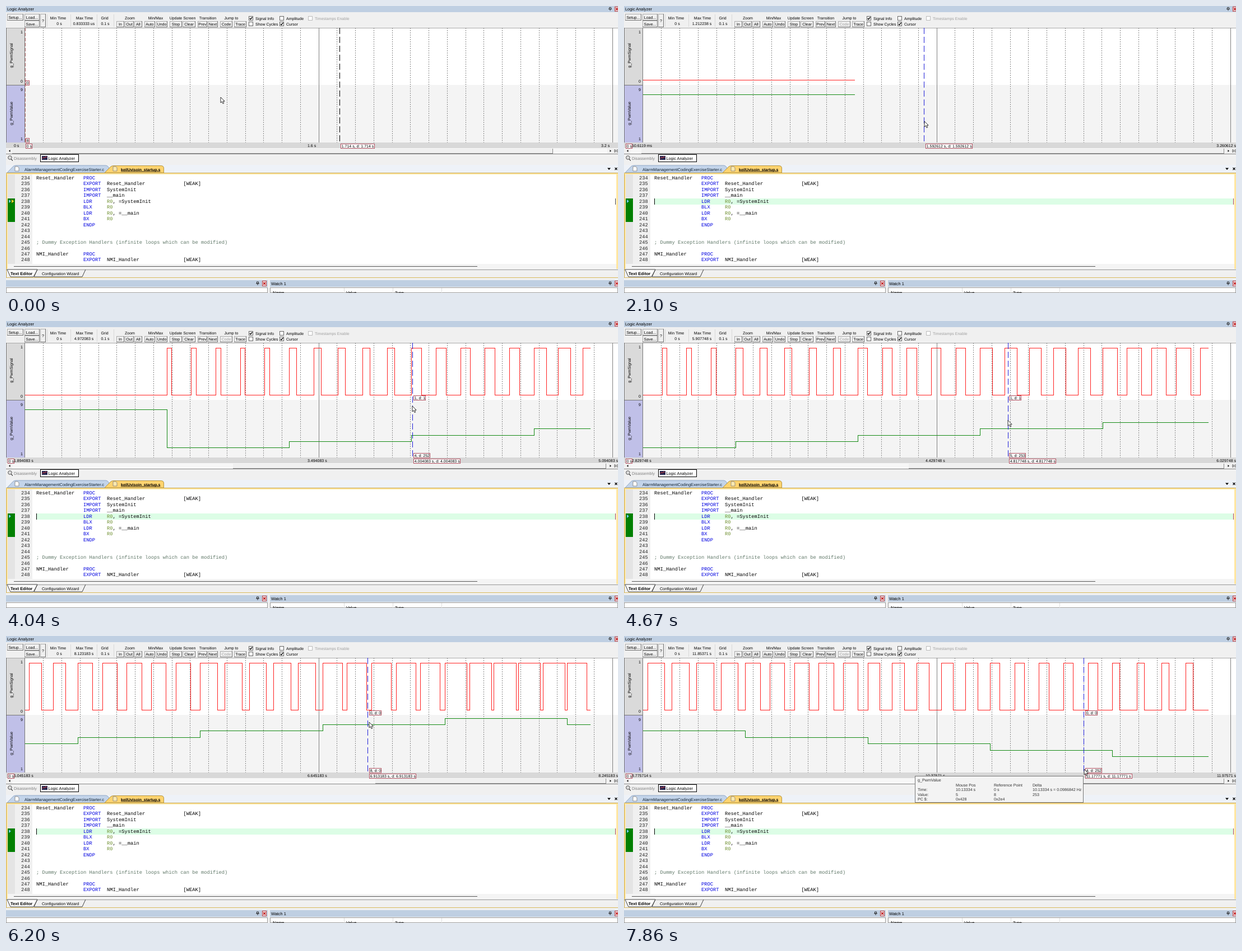
An HTML page that plays this animation: 1092 by 513 pixels, repeating every 7.99 s.

```html
<!DOCTYPE html>
<html lang="en">
<head>
<meta charset="utf-8">
<title>Logic Analyzer</title>
<style>
html, body { margin: 0; width: 1092px; height: 513px; overflow: hidden; background: #f0f0f0; }
svg { display: block; }
text { font-family: "Liberation Sans", Arial, sans-serif; white-space: pre; text-rendering: geometricPrecision; }
.code text { font-family: "Liberation Mono", "Courier New", monospace; }
rect, .crisp { shape-rendering: crispEdges; }
</style>
</head>
<body>
<svg width="1092" height="513" viewBox="0 0 1092 513">
  <g id="base"></g><g id="plot"></g><g id="code" class="code"></g><g id="over"></g>
</svg>
<script>
const LOOP = 7990, LEFT = 34, SCALE = 327.5, SPAN = 3.2;
const START = 2.6673, STEP = 2 / 3, PULSE = STEP / 5;

const $ = id => document.getElementById(id);
const rect = (x, y, w, h, fill, stroke) => stroke
  ? `<rect x="${x + .5}" y="${y + .5}" width="${w - 1}" height="${h - 1}" fill="${fill}" stroke="${stroke}"/>`
  : `<rect x="${x}" y="${y}" width="${w}" height="${h}" fill="${fill}"/>`;
const path = (d, stroke, fill = 'none', more = '') =>
  `<path d="${d}" stroke="${stroke}" fill="${fill}" ${more}/>`;
const line = (d, stroke, dash = '') =>
  path(d, stroke, 'none', `class="crisp" stroke-dasharray="${dash}"`);
const text = (x, y, s, size = 7, fill = '#000', more = '') =>
  `<text x="${x}" y="${y}" font-size="${size}" fill="${fill}" ${more}>${s}</text>`;
const mid = (x, y, s, fill) => text(x, y, s, 7, fill, 'text-anchor="middle"');

function button(x, y, w, h, label, fill) {
  return rect(x, y, w, h, '#f0f0f0', '#aaa') +
    line(`M${x} ${y + h - .5}H${x + w - .5}V${y}`, '#707070') +
    mid(x + w / 2, y + h / 2 + 2.5, label, fill);
}

function check(x, y, label, on, fill = '#000') {
  return rect(x, y, 8, 8, '#fff', fill === '#000' ? '#666' : '#bbb') +
    (on ? path(`M${x + 1.8} ${y + 3.8}l1.6 1.9l3-3.7`, '#000', 'none', 'stroke-width="1.3"') : '') +
    text(x + 12, y + 6.7, label, 7, fill);
}

const close = (x, y, c) => path(`M${x - 2} ${y - 2}l4 4m0-4l-4 4`, c, 'none', 'stroke-width="1.2"');
const pin = (x, y) => path(`M${x - 1.5} ${y - 3}h3v3h-3zm-1.5 3h6m-3 0v3`, '#222', 'none', 'stroke-width=".9"');

function titleBar(x, y, w, h, label) {
  const end = x + w;
  return rect(x, y, w, h, '#bfcfe2') + text(x + 2, y + h - 3.4, label, 7.4) +
    pin(end - (end > 1000 ? 14 : 18), y + h / 2) +
    rect(end - (end > 1000 ? 6 : 10), y + 1, 8, h - 2, '#eadfe4', '#c04848') +
    close(end - (end > 1000 ? 2 : 6), y + h / 2, '#c00000');
}

function base() {
  let s = titleBar(0, 0, 1092, 11, 'Logic Analyzer') + rect(0, 11, 1092, 28, '#f0f0f0');
  s += button(2, 14, 29, 12, 'Setup...') + button(33, 14, 27, 12, 'Load...') +
    button(33, 26, 27, 12, 'Save...') + button(61, 14, 10, 24, '?');
  [['Min Time', 93], ['Max Time', 140], ['Grid', 176], ['Zoom', 221], ['Min/Max', 267],
    ['Update Screen', 315], ['Transition', 360], ['Jump to', 402]].forEach(([n, x]) => s += mid(x, 24.3, n));
  s += line('M73.5 15V37M115.5 15V37M162.5 15V37M192.5 15V37', '#d8d8d8') + mid(95, 34.3, '0 s') + mid(177, 34.3, '0.1 s');
  [['In', 197, 14], ['Out', 212, 16], ['All', 229, 14], ['Auto', 247, 19], ['Undo', 268, 20], ['Stop', 292, 22],
    ['Clear', 315, 23], ['Prev', 342, 17], ['Next', 360, 18], ['Trace', 407, 22]]
    .forEach(([n, x, w]) => s += button(x, 27, w, 11, n));
  s += check(433, 18, 'Signal Info', 1) + check(433, 28, 'Show Cycles', 0) + check(488, 18, 'Amplitude', 0) +
    check(488, 28, 'Cursor', 1) + check(539, 18, 'Timestamps Enable', 0, '#a0a0a0');

  // Analyzer panes
  s += rect(0, 39, 34, 102, '#dadada') + rect(0, 141, 34, 103, '#c0c0e8') +
    rect(34, 39, 1058, 102, '#fff') + rect(34, 141, 1058, 103, '#f4f4f4') +
    line('M0 39.5H1092', '#aaa') + line('M.5 39V244M33.5 39V244M0 141.5H34M0 244.5H34', '#777');
  [['1', 48.5], ['0', 136.5], ['9', 151.5], ['1', 239.5]].forEach(([n, y]) => s += text(26, y, n));
  [['g_PwmSignal', 88.5], ['g_PwmValue', 192]].forEach(([n, y]) =>
    s += text(0, 0, n, 7.2, '#000', `text-anchor="middle" transform="translate(12 ${y}) rotate(-90)"`));
  let grid = '';
  for (let i = 1; i < 32; i++) if (i !== 16) grid += `M${Math.floor(LEFT + i * 32.75) + .5} 39V244`;
  s += line(grid, '#858585', '2 2') + line('M558.5 39V244M1082.5 39V244', '#808080') +
    rect(0, 244, 1092, 10, '#d8d8d8') + rect(0, 254, 1092, 10, '#f7f7f7');

  // Pane tabs
  s += rect(0, 264, 1092, 20, '#f0f0f0') + line('M0 264.5H1092', '#888') +
    '<circle cx="7" cy="271" r="3.3" fill="#ddd" stroke="#555"/>' + line('M9 273l3 4', '#555') +
    text(14, 275, 'Disassembly', 7.2, '#808080') + rect(61, 265, 69, 14, '#fff', '#000') +
    rect(64, 268, 10, 7, '#26264e') + path('M65 273l2-3 2 2 2-3 2 2', '#d04040') + text(75.5, 275, 'Logic Analyzer', 7.3);

  // Editor
  s += rect(0, 284, 1092, 15, '#eef2f8') +
    path('M2 298L13 286.5Q15 285 18 285H178Q184 285 186 298Z', '#91a7c4', '#c3d4ea') +
    path('M176 298L187 287Q189 285.5 192 285.5H277Q281 285.5 281.5 289V298Z', '#b59642', '#ffd470');
  [[16, '#fff'], [191, '#ffe9ae']].forEach(([x, c]) =>
    s += path(`M${x} 287h5l2 2v6h-7z`, '#7d7d7d', c, 'stroke-width=".8"'));
  s += text(33, 294.5, 'AlarmManagementCodingExerciseStarter.c', 7.42, '#123') +
    text(205, 294.5, 'keilUvisoin_startup.s', 7, '#000', 'font-weight="bold" text-decoration="underline"') +
    path('M1073 289.5h6l-3 3.5z', 'none', '#000') + close(1088.5, 291, '#000');
  s += rect(0, 298, 1092, 188, '#ffe6a0') + line('M0 298.5H1092', '#c9a850') +
    rect(3, 301, 1086, 160, '#fff') + rect(3, 301, 13, 160, '#e4e4e4') + rect(16, 301, 31, 160, '#f0f0f0') +
    rect(3, 344, 13, 42, '#008000') +
    rect(3, 461, 1086, 9, '#f4f4f4') + line('M14 465.5H841', '#555') +
    rect(0, 470, 1092, 15, '#f0f0f0') + line('M0 471.5H1092', '#999') + line('M.5 300V485', '#c9a850') +
    path('M2 471L8 484H49L56 471Z', '#444', '#fff') + path('M56 471L50 484H136L142 471', '#444') +
    text(8, 481, 'Text Editor', 7.65, '#000', 'font-weight="bold"') + text(64, 481, 'Configuration Wizard', 7.1) +
    rect(0, 485, 1092, 1, '#d9b95c') + rect(0, 486, 1092, 4, '#f0f0f0');

  // Lower panes
  s += titleBar(0, 490, 467, 12, '') + titleBar(471, 490, 621, 12, 'Watch 1') +
    rect(0, 503, 467, 10, '#fff', '#999') + rect(471, 503, 621, 10, '#fff', '#999') +
    line('M603.5 504V513M690.5 504V513M777.5 504V513', '#ddd') +
    text(476, 514.5, 'Name', 7.6) + text(607, 514.5, 'Value', 7.4) + text(694, 514.5, 'Type', 7.3);
  return s;
}

function code() {
  const op = (name, rest = '') => ' '.repeat(16) + name.padEnd(8) + rest;
  const weak = name => op('EXPORT', name.padEnd(26) + '[WEAK]');
  const lines = ['Reset_Handler   PROC', weak('Reset_Handler'), op('IMPORT', 'SystemInit'), op('IMPORT', '__main'),
    op('LDR', 'R0, =SystemInit'), op('BLX', 'R0'), op('LDR', 'R0, =__main'), op('BX', 'R0'), op('ENDP'), '', '',
    '; Dummy Exception Handlers (infinite loops which can be modified)', '', 'NMI_Handler     PROC', weak('NMI_Handler')];
  const span = c => `<tspan fill="${c}">$&</tspan>`;
  return lines.map((l, i) => {
    const y = 310 + i * 10.46;
    const body = l.replace(/\b(PROC|EXPORT|IMPORT|LDR|BLX|BX|ENDP)\b/g, span('#0000e0'))
      .replace(/\bR0\b/g, span('#6f9030'));
    return text(27, y, 234 + i, 8.75, '#222') + text(54, y, body, 8.75, l[0] === ';' ? '#607868' : '#000');
  }).join('');
}

// time, captured seconds, cursor offset, pointer x, pointer y
const KEYS = [
  [0, 0, 1.714, 383, 163], [70, 0, 1.066, 330, 100], [120, 0, .794, 0, -40],
  [1050, .02, .794, 400, 45], [2100, 1.212238, 1.532, 536, 206], [4040, 4.972083, 2.11, 725, 152],
  [5300, 6.843413, 1.866, 645, 203], [6200, 8.123183, 1.868, 648, 154], [6760, 8.981947, 2.134, 744, 206],
  [7660, 11.33, 1.47, 516, 232], [7860, 11.853714, 2.402, 821, 238]];
const BEATS = [0, 70, 120, 1050, 2100, 2230, 2580, 4040, 6200, 7860];

function snap(t) {
  const s = BEATS.filter(b => b <= t).pop();
  if (s < 1050 || s === 2100 || s === 7860) return s;
  const q = s + Math.floor((t - s) / 70) * 70;
  return s === 2230 ? Math.min(q, 2440) : q;
}

function pose(t) {
  const i = KEYS.findLastIndex(k => k[0] <= t), a = KEYS[i], b = KEYS[i + 1];
  if (!b || t < 1050) return a;
  const f = (t - a[0]) / (b[0] - a[0]);
  return a.map((v, j) => v + (b[j] - v) * f);
}

const level = k => k < 0 ? 8 : k <= 7 ? k + 2 : 16 - k;
const levelAt = t => level(Math.floor((t - START) / STEP));
function signalAt(t) {
  const p = (t - START) / PULSE;
  return p >= 0 && p % 1 < levelAt(t) / 10 ? 1 : 0;
}
const num = v => String(+v.toPrecision(7));
const sec = v => v > 0 && v < 1 ? num(v * 1000) + ' ms' : num(v) + ' s';
const crisp = x => Math.floor(x) + .5;

function tag(x, y, s) {
  const w = [...s].reduce((n, c) => n + (/[,.: ]/.test(c) ? .278 : c === 's' ? .5 : c === 'm' ? .833 : .556), 0) * 7;
  return rect(Math.round(x), y, Math.round(w + 3), 9, '#fff', '#b05060') + text(Math.round(x) + 1.7, y + 7, s);
}

function traces(left, max) {
  const px = t => crisp(LEFT + Math.max(0, t - left) * SCALE);
  const ly = v => crisp(147 + (9 - v) * 11.4);
  let sig = `M${LEFT} ${signalAt(left) ? 48.5 : 132.5}`, val = `M${LEFT} ${ly(levelAt(left))}`;
  for (let n = Math.max(0, Math.floor((left - START) / PULSE)); START + n * PULSE < max; n++) {
    const rise = START + n * PULSE, k = Math.floor(n / 5), fall = rise + PULSE * level(k) / 10;
    if (rise > left) sig += `H${px(rise)}V48.5`;
    if (fall > left && fall < max) sig += `H${px(fall)}V132.5`;
    if (n % 5 === 0 && rise > left) val += `H${px(rise)}V${ly(level(k))}`;
  }
  return line(`${sig}H${px(max)}`, '#ff2020') + line(`${val}H${px(max)}`, '#148a14');
}

function draw(t) {
  const [, max, off, mx, my] = pose(t), live = t >= 1050;
  const left = Math.max(max * .05, max - 3.078), gap = Math.round(off * 500) / 500;
  const x = LEFT + gap * SCALE, at = left + gap;
  let s = mid(139, 34.3, live ? sec(max) : '0.833333 us') +
    button(382, 27, 22, 11, 'Code', live ? '#a0a0a0' : '#000');
  if (live) s += traces(left, max);
  else s += line('M34.5 39V244', '#c07878', '6 3') + tag(35, 133, '0') + tag(35, 236, '8');
  s += line(`M${crisp(x)} 39V244`, live ? '#2020d8' : '#000', '11 5');

  s += text(14, 251.7, sec(left)) + text(538, 251.7, sec(left + SPAN / 2)) +
    (live ? text(1092, 251.7, sec(left + SPAN), 7, '#000', 'text-anchor="end"') : text(1062, 251.7, '3.2 s')) +
    tag(live ? 3 : 35, 246, '0 s') + tag(x + 2, 246, `${num(at)} s, d: ${num(at)} s`);
  if (live && at <= max) {
    const v = levelAt(at), b = signalAt(at);
    s += tag(x + 2, 133, `${b}, d: ${b}`) + tag(x + 2, 236, `${v}, d: ${(v - 8) & 255}`);
  }

  // Scroll bar
  const thumb = live ? 1059 * SPAN / (left + SPAN) : 964, from = live ? 1070 - thumb : 11;
  s += rect(0, 255, 11, 9, '#f0f0f0') + rect(from, 255, thumb, 9, '#f0f0f0') +
    line(`M${from} 263.5H${crisp(from + thumb)}V255`, '#888') + rect(1073, 255, 19, 9, '#f0f0f0') +
    path('M7.5 257v4l-2.5-2z', 'none', '#000') + path('M1077.5 257v4l2.5-2z', 'none', '#000') +
    path('M1086 256.5l3 2.5-3 2.5zM1090.5 256v6', '#555');

  // Current line
  if (live) s += rect(54, 344, 1033, 11, '#dcfde6') + line('M54.5 344V355', '#000');
  s += line('M1087.5 344V355', live ? '#b04050' : '#444') +
    path('M5 345.5v7l4-3.5z', '#064', '#7fe0ff', 'stroke-width=".6"') +
    (live ? '' : path('M10 345.5v7l4.5-3.5z', '#640', '#ffee30', 'stroke-width=".6"'));
  $('plot').innerHTML = s;

  let o = '';
  if (t >= 7730) {
    o += rect(519, 250, 301, 48, '#f3f3f3', '#777') + text(524, 260.3, 'g_PwmValue', 7.2, '#333');
    [[592, 'Mouse Pos', '10.13334 s', '5', '0x428'], [660, 'Reference Point', '0 s', '8', '0x2e4'],
      [729, 'Delta', '10.13334 s = 0.0986842 Hz', '253', ''], [524, '', 'Time:', 'Value:', 'PC $:']]
      .forEach(([cx, ...rows]) => rows.forEach((r, i) => o += text(cx, 268.7 + i * 8.4, r, 7.1, '#333')));
  }
  o += path('M0 0V10L2.3 7.8L4 11.6L5.8 10.8L4.2 7.2H7.2Z', '#000', '#fff',
    `stroke-width=".8" transform="translate(${mx} ${my})"`);
  $('over').innerHTML = o;
}

$('base').innerHTML = base();
$('code').innerHTML = code();
const origin = performance.now();
let shown = -1;
function tick() {
  const t = snap((performance.now() - origin) % LOOP);
  if (t !== shown) draw(shown = t);
  requestAnimationFrame(tick);
}
tick();
</script>
</body>
</html>
```
